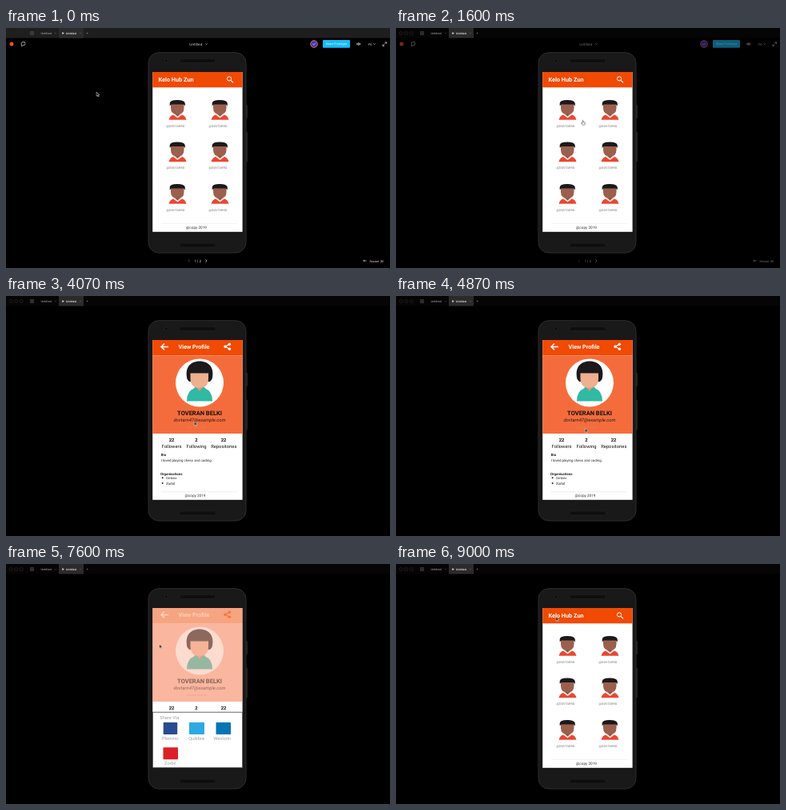
These frames come from a looping animation (480x300 px, 9.47 s). An HTML page:

```html
<!DOCTYPE html>
<html lang="en">
<head>
<meta charset="utf-8">
<title>Prototype preview</title>
<style>
  html, body { margin: 0; width: 100%; height: 100%; overflow: hidden; background: #000; }
  svg { display: block; width: 480px; height: 300px; font-family: Roboto, sans-serif; text-rendering: geometricPrecision; }
  .ui { font-family: Inter, sans-serif; font-size: 4.4px; fill: #ddd; }
  .mid { text-anchor: middle; }
  .bold { font-weight: 700; }
  .line { fill: none; stroke: #ddd; stroke-width: .7; }
  .handle { font-size: 3.8px; fill: #777; }
  .stat { font-size: 5.8px; fill: #111; }
  .body { font-size: 4.4px; fill: #222; }
  .share { font-size: 5.7px; fill: #a0a0a0; }

  .loop { animation: 9470ms infinite step-end; }
  .bar { animation-name: bar; }
  .tools { animation-name: tools; animation-timing-function: linear; }
  .home { animation-name: home; }
  .profile { animation-name: profile; }
  .sheet { animation-name: sheet; }
  .dim { animation-name: dim; }
  .tint { animation-name: tint; }
  .cursor { animation-name: move; animation-timing-function: linear; }
  .arrow { animation-name: arrow; }
  .hand { animation-name: hand; }

  @keyframes bar { 0% { fill: #1e1e1e; } 2.8%, 100% { fill: #050505; } }
  @keyframes tools { 0%, 14.8% { opacity: 1; } 19%, 100% { opacity: 0; } }
  @keyframes home { 0% { opacity: 1; } 30.93% { opacity: 0; } 94.29%, 100% { opacity: 1; } }
  @keyframes profile { 0% { opacity: 0; } 30.93% { opacity: 1; } 94.29%, 100% { opacity: 0; } }
  @keyframes sheet { 0% { opacity: 0; } 63.35% { opacity: 1; } 82.36%, 100% { opacity: 0; } }
  @keyframes dim { 0% { opacity: 1; } 63.35% { opacity: .5; } 82.36%, 100% { opacity: 1; } }
  @keyframes tint { 0% { color: #fff; } 63.35% { color: #f2744a; } 82.36%, 100% { color: #fff; } }
  @keyframes arrow { 0% { opacity: 1; } 9.8% { opacity: 0; } 30.93%, 100% { opacity: 1; } }
  @keyframes hand { 0% { opacity: 0; } 9.8% { opacity: 1; } 30.93%, 100% { opacity: 0; } }
  @keyframes move {
    0% { transform: translate(113px, 80px); }
    5.6%, 7% { transform: translate(209px, 57px); }
    9.82%, 14.8% { transform: translate(231px, 121px); }
    16.9% { transform: translate(233px, 115.5px); }
    19.75%, 24.6% { transform: translate(221px, 117px); }
    26.08%, 30.92% { transform: translate(211px, 99px); }
    30.93%, 35.9% { transform: translate(213px, 107.3px); }
    37.4% { transform: translate(219px, 100px); }
    40.13%, 42.3% { transform: translate(240px, 161px); }
    44.6% { transform: translate(225px, 147px); }
    47% { transform: translate(235px, 172px); }
    49.3% { transform: translate(243px, 160px); }
    51.43%, 53.5% { transform: translate(236.5px, 165.5px); }
    56.28%, 57.7% { transform: translate(297px, 92px); }
    59.13%, 67.6% { transform: translate(275.6px, 63px); }
    71.07%, 73.2% { transform: translate(216px, 152px); }
    76.03%, 77.4% { transform: translate(198px, 205px); }
    80.25%, 81.7% { transform: translate(191.7px, 100.3px); }
    87.96%, 100% { transform: translate(199.8px, 66px); }
  }
</style>
</head>
<body>
<svg viewBox="0 0 480 300">
  <defs>
    <g id="man">
      <path d="M-10.5 24.8Q-9.5 19.5-3 17.5H4Q10.5 19.5 11.5 24.8Z" fill="#ec4630"/>
      <path d="M-5.5 18.2-3 16.5H4L6.5 18.2 .5 22.5Z" fill="#f3e4df"/>
      <path d="M-2.8 13H3.8V17.5L.5 20.5-2.8 17.5Z" fill="#84503f"/>
      <path d="M-8 4H8.5V10Q8.5 18 .3 18T-8 10Z" fill="#9a604d"/>
      <path d="M-9.3 7.5V4Q-9 0 0 0T9.8 4V7.5L8 5.5H-7.5Z" fill="#1b191b"/>
    </g>
    <g id="user"><use href="#man" x="214" y="90"/><text class="handle mid" x="212" y="123.7">@DOVTARRO</text></g>
    <g id="row"><use href="#user"/><use href="#user" x="53"/></g>
    <clipPath id="face"><circle cx="242" cy="108.5" r="29.5"/></clipPath>
    <path id="chev" d="M-1.2-.6 0 .6 1.2-.6" class="line"/>
    <path id="close" d="M-.8-.8 .8 .8M.8-.8-.8 .8" class="line" opacity=".22"/>
  </defs>

  <rect width="480" height="300"/>
  <rect class="loop bar" width="480" height="12.5"/>
  <rect x="66" width="31" height="12.5" fill="#2b2b2b"/>
  <g fill="none" stroke="#262626" stroke-width=".7"><circle cx="6.3" cy="6.5" r="2"/><circle cx="12.8" cy="6.5" r="2"/><circle cx="19.3" cy="6.5" r="2"/></g>
  <path d="M30.5 4.5h4v4h-4zM32.5 4.5v4M30.5 6.5h4" fill="none" stroke="#555" stroke-width=".6"/>
  <g class="ui" style="font-size:3.6px">
    <text x="43.5" y="8" fill="#bbb">Untitled</text>
    <path d="M70.4 5v3.2l2.3-1.6Z"/>
    <text class="bold" x="75" y="8" style="font-size:3.3px">Untitled</text>
  </g>
  <use href="#close" x="62" y="6.5"/><use href="#close" x="93" y="6.5"/>
  <path d="M100.3 6.5h2.6m-1.3-1.3v2.6" class="line" opacity=".3"/>

  <g class="loop tools ui">
    <circle cx="7" cy="20" r="2.5" fill="#f24e1e"/>
    <path d="M19.3 22.5v-3a2.3 2.3 0 1 1 2.3 2.3Z" class="line"/>
    <text class="mid" x="237.3" y="21.6">Untitled</text>
    <use href="#chev" x="250.5" y="20"/>
    <circle cx="385" cy="20" r="4.4" fill="#3540b8" stroke="#ee5548" stroke-width="1"/>
    <path d="M383.2 19.8l1.3 1.4 2.4-2.5" class="line"/>
    <rect x="396" y="15" width="34" height="9.7" rx="1" fill="#18bdf8"/>
    <text class="mid" x="413" y="21.2" style="font-size:3.5px;fill:#fff">Share Prototype</text>
    <path d="M438.2 20q2.5-3 5 0-2.5 3-5 0Z" class="line"/><circle cx="440.7" cy="20" r=".8"/>
    <text x="453" y="21.5" style="font-size:4px">Fit</text><use href="#chev" x="460.5" y="20"/>
    <path d="M473.5 17.8h2v2M475.5 17.8l-2 2M473 22.4h-2v-2M471 22.4l2-2" class="line"/>
    <path d="M229.3 289.3l-1.4 1.7 1.4 1.7" class="line" opacity=".45"/>
    <text class="mid" x="240" y="292.6">1 / 2</text>
    <path d="M249.5 289.3l1.4 1.7-1.4 1.7" class="line"/>
    <path d="M448 289.7l-1.3 1.3 1.3 1.3M447 291h3.5" class="line"/>
    <text x="454.5" y="292.6" style="font-size:3.6px">Restart (R)</text>
  </g>

  <g fill="#222">
    <rect x="299" y="96" width="3" height="17" rx="1"/>
    <rect x="299" y="129.5" width="3" height="38" rx="1"/>
    <rect x="178" y="30.7" width="122" height="250.3" rx="13" fill="#191919" stroke="#2d2d2d" stroke-width="1"/>
  </g>
  <g fill="#0e0e0e" stroke="#242424" stroke-width=".5">
    <rect x="217" y="38.5" width="45" height="5" rx="2.5"/>
    <rect x="217" y="269" width="45" height="5" rx="2.5"/>
    <circle cx="200.3" cy="41" r="2.2" stroke="#333"/>
  </g>
  <rect x="183.2" y="55" width="112.4" height="199.8" fill="#fff"/>
  <rect class="loop dim" x="183.2" y="55" width="112.4" height="19.3" fill="#f04a04"/>

  <g class="loop home">
    <text class="bold" x="190.5" y="66.5" font-size="7.3" fill="#fff">Kelo Hub Zun</text>
    <circle cx="279" cy="63.4" r="2.6" fill="none" stroke="#fff" stroke-width="1"/>
    <path d="M281 65.4l3 3" stroke="#fff" stroke-width="1.3"/>
    <use href="#row"/><use href="#row" y="52.5"/><use href="#row" y="105"/>
    <path d="M194 244.5h95" stroke="#e6e6e6" stroke-width=".5"/>
    <text class="mid" x="238" y="251" font-size="4.7" fill="#333">@copy 2019</text>
  </g>

  <g class="loop profile">
    <rect class="loop dim" x="183.2" y="74.3" width="112.4" height="97.7" fill="#f56c3c"/>
    <g class="loop dim">
      <path d="M203 63.4h-8.5M198 59.5l-4 3.9 4 3.9" fill="none" stroke="#fff" stroke-width="1.5"/>
      <text class="mid bold" x="235" y="66.3" font-size="7.2" fill="#fff">View Profile</text>
      <circle cx="242" cy="108.5" r="30" fill="#fff"/>
      <g clip-path="url(#face)">
        <path d="M226 131.5Q226 119 235 115.5L238 111H246L249 115.5Q258 119 258 131.5Z" fill="#30b9a3"/>
        <path d="M238 110h8v4l-4 5-4-5Z" fill="#dd9878"/>
        <path d="M226.5 104C223 90 230 81.5 242 81.5S261 90 257.5 104L255 107H229Z" fill="#1c191c"/>
        <path d="M230.5 96.5H253V103Q253 115 241.8 115T230.5 103Z" fill="#eeb08e"/>
      </g>
      <g class="mid">
        <text class="bold" x="242" y="149" font-size="7.5" fill="#111">TOVERAN BELKI</text>
        <text x="242" y="157.4" font-size="5.9" font-style="italic" fill="#222">dovtarn47@example.com</text>
        <text x="238" y="165" font-size="3.3" fill="#d98760">view full account</text>
      </g>
    </g>
    <g class="loop tint">
      <path d="M280 60 274 63.3 280 66.6" fill="none" stroke="currentColor" stroke-width="1.1"/>
      <g fill="currentColor"><circle cx="279.4" cy="60.3" r="1.7"/><circle cx="274" cy="63.3" r="1.7"/><circle cx="279.4" cy="66.3" r="1.7"/></g>
    </g>
    <g class="stat mid">
      <g class="bold"><text x="207" y="182.3">22</text><text x="238" y="182.3">2</text><text x="272" y="182.3">22</text></g>
      <text x="207" y="190.4">Followers</text><text x="238" y="190.4">Following</text><text x="272.3" y="190.4">Repositories</text>
    </g>
    <g class="body">
      <text class="bold" x="193.7" y="200.2">Bio</text>
      <text x="193.7" y="206.6">I loved playing chess and coding.</text>
      <text class="bold" x="193" y="223.6">Organisations</text>
      <circle cx="195.7" cy="227.3" r="1"/><text x="200" y="228.9" font-size="4.2">Ombrix</text>
      <circle cx="195.7" cy="234" r="1"/><text x="200" y="235.5">Zorbil</text>
    </g>
    <path d="M194 244.7h94" stroke="#ccc" stroke-width=".5" stroke-dasharray="1 .5"/>
    <text class="mid" x="236.5" y="251" font-size="4.7" fill="#333">@copy 2019</text>
  </g>

  <g class="loop sheet">
    <rect x="183.4" y="185.2" width="112" height="69.4" fill="#fff" stroke="#444" stroke-width=".8"/>
    <g class="share">
      <text x="192.3" y="193.6">Share Via</text>
      <rect x="196.7" y="198" width="17.5" height="15" rx=".8" fill="#294b91"/>
      <rect x="229" y="198" width="19" height="15" rx=".8" fill="#2daae1"/>
      <rect x="262.5" y="198" width="18.5" height="15" rx=".8" fill="#0875b3"/>
      <rect x="196.5" y="229.3" width="18.5" height="15" rx=".8" fill="#dc2027"/>
      <g class="mid"><text x="205.3" y="220.2">Plonviro</text><text x="238" y="220.2">Quibbra</text><text x="270.3" y="220.2">Wexlorin</text><text x="205.3" y="251.3">Zorbil</text></g>
    </g>
  </g>

  <g class="loop cursor" stroke-linejoin="round">
    <path class="loop arrow" d="M0 0V5.2L1.2 4.1 2 6 2.9 5.6 2.1 3.8H3.7Z" fill="#111" stroke="#fff" stroke-width=".5"/>
    <path class="loop hand" d="M0 .4Q.6-.4 1.1.4V2L3 2.5Q3.6 2.8 3.4 4L2.8 5.6H.2L-1.3 3.4Q-1.2 2.7 0 3.2Z" fill="#fff" stroke="#333" stroke-width=".6"/>
  </g>
</svg>
</body>
</html>
```
